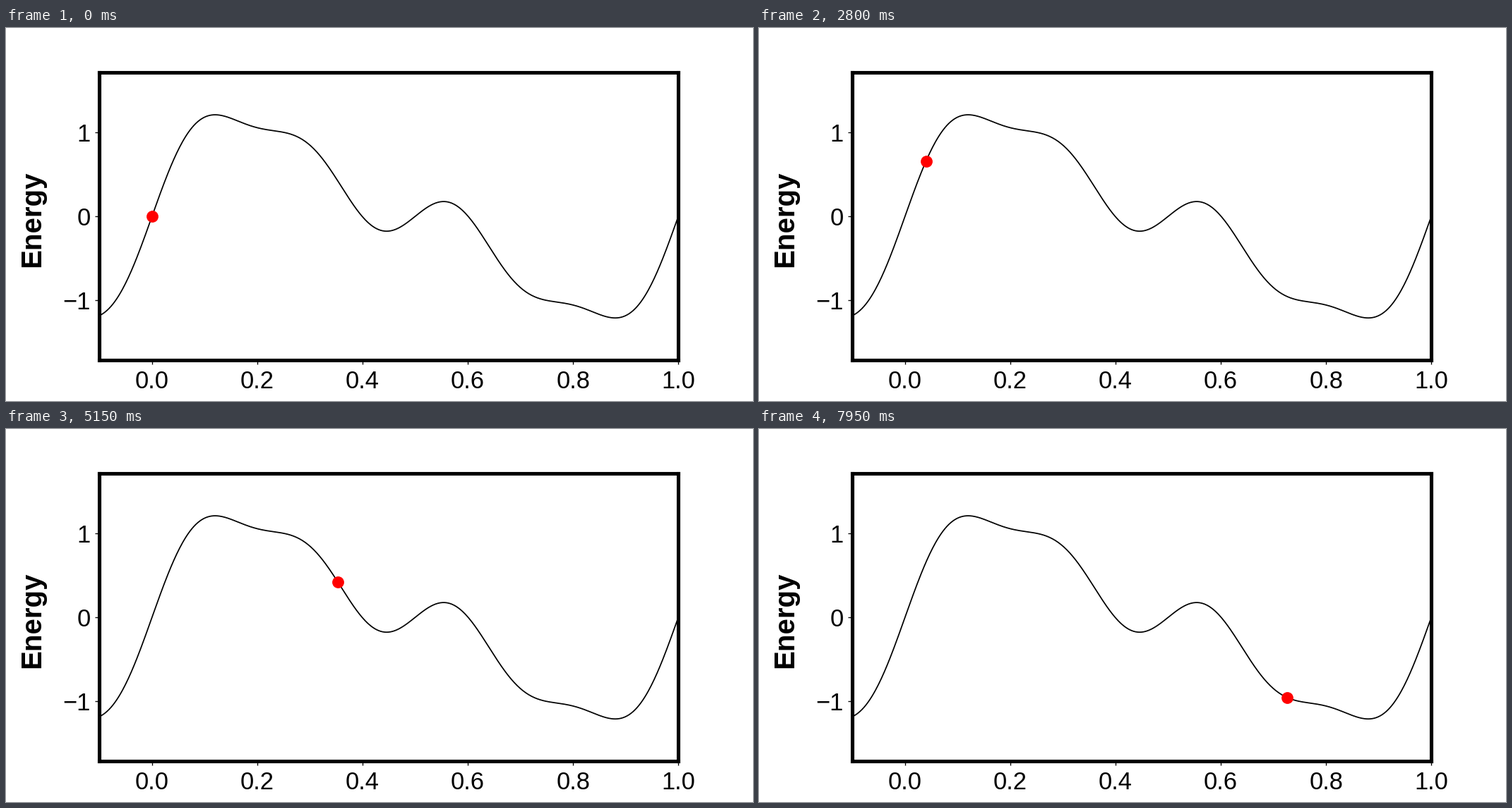
A matplotlib script for the animation above (8 s loop, 1058 by 529 pixels).

```python
import numpy as np
import matplotlib.pyplot as plt
from matplotlib.animation import FuncAnimation

W, H, DPI = 1058, 529, 128
PX = 72 / DPI  # points per pixel
FRAMES, STEP_MS = 160, 50
WAIT = 50      # frames spent trembling at the start
TRAVEL = 150   # frames for the full path

plt.rcParams["font.family"] = "Liberation Sans"


def energy(x):
    turn = 2 * np.pi * x
    return np.sin(turn) + 0.5 * np.sin(2 * turn) + 0.2 * np.sin(4 * turn)


def position(i):
    if i < WAIT:
        return 0.01 * np.sin(4 * np.pi * i / WAIT)
    return (i - WAIT) / TRAVEL


def label(x, y, text, size, **style):
    """Write text with its baseline at pixel (x, y), y counted from the top."""
    fig.text(x / W, 1 - y / H, text, fontsize=size * PX, va="baseline", **style)


fig = plt.figure(figsize=(W / DPI, H / DPI), dpi=DPI, facecolor="white")
ax = fig.add_axes([0.125, 0.11, 0.775, 0.77])

xs = np.linspace(-0.1, 1, 600)
ys = energy(xs)
ax.plot(xs, ys, color="black", lw=1.75 * PX)
ax.set_xlim(-0.1, 1)
ax.set_ylim(ys.min() - 0.5, ys.max() + 0.5)

x_ticks = np.arange(6) / 5
y_ticks = [-1, 0, 1]
ax.set_xticks(x_ticks, [])
ax.set_yticks(y_ticks, [])
ax.tick_params(length=5.9 * PX, width=1.35 * PX)
for spine in ax.spines.values():
    spine.set_linewidth(5.1 * PX)


def to_pixels(x, y):
    px, py = ax.transData.transform((x, y))
    return px, H - py


for t in x_ticks:
    label(to_pixels(t, 0)[0], 511, f"{t:.1f}", 34.5, ha="center")
for t in y_ticks:
    text = str(t).replace("-", "\u2212")
    label(119.5, to_pixels(0, t)[1] + 12.8, text, 34.5, ha="right")
label(48, 270.5, "Energy", 40.2, ha="center", weight="bold",
      rotation=90, rotation_mode="anchor")

dot, = ax.plot([0], [0], "o", color="red", ms=16.8 * PX, mew=0, zorder=3)


def update(i):
    x = position(i)
    dot.set_data([x], [energy(x)])
    return dot,


anim = FuncAnimation(fig, update, frames=FRAMES, interval=STEP_MS,
                     repeat=True, repeat_delay=0)
plt.show()
```
